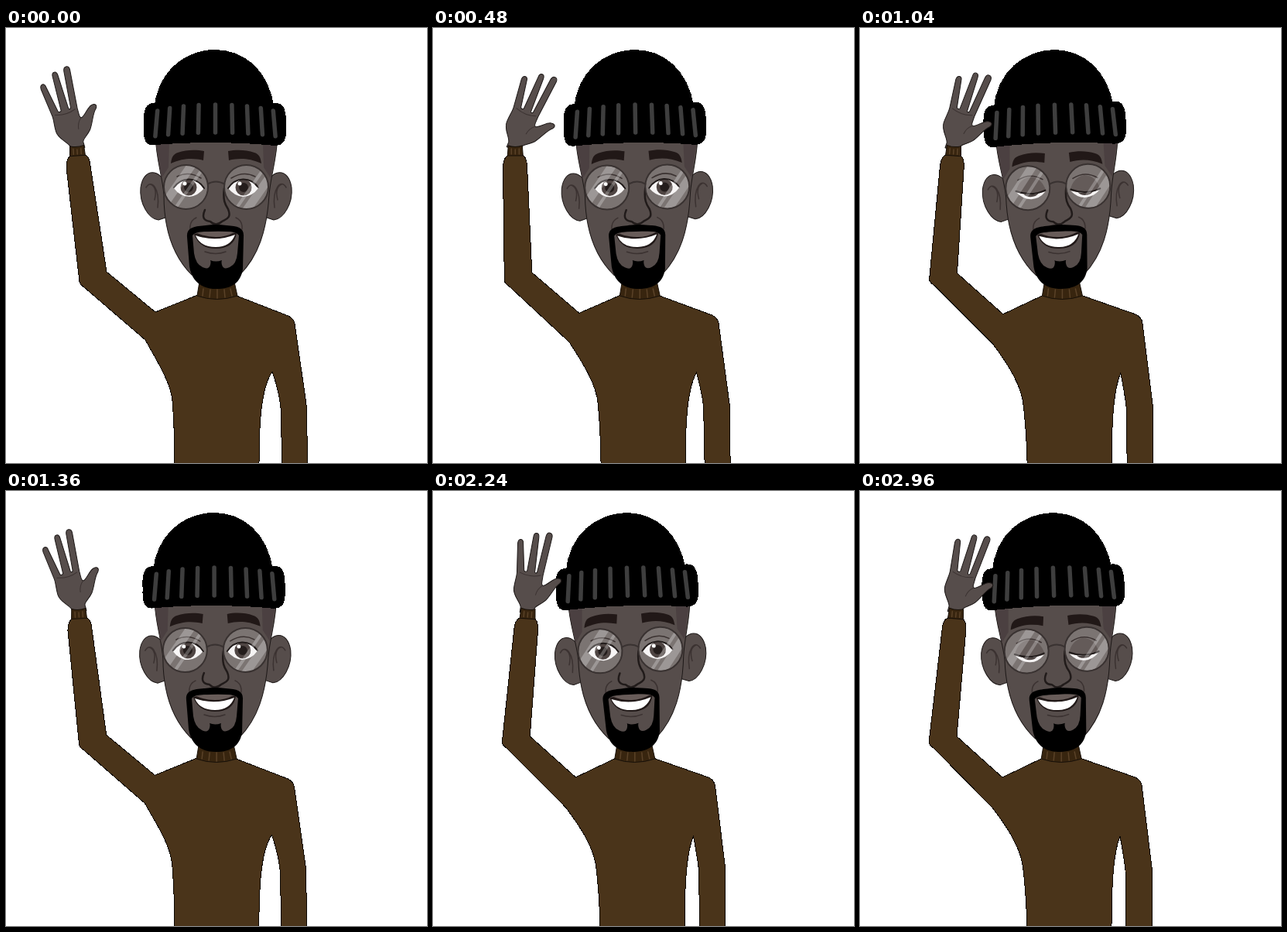
Write an HTML page that moves like this. It is 544 px wide and 562 px high and loops after 3.04 s.

```html
<!DOCTYPE html>
<html lang="en">
<head>
<meta charset="utf-8">
<title>Waving man</title>
<style>
  html, body { margin: 0; width: 100%; height: 100%; overflow: hidden; background: #fff; }
  svg { display: block; width: 544px; height: 562px; }
  .line { fill: none; stroke: #211b1a; stroke-width: 2; stroke-linecap: round; stroke-linejoin: round; }
  .soft { fill: none; stroke: #3b3231; stroke-width: 1.5; stroke-linecap: round; }
  .skin { fill: #564d4b; stroke: #1d1817; stroke-width: 1; stroke-linejoin: round; }
  .wool { fill: #4a341a; stroke: #0c0804; stroke-width: 1; stroke-linejoin: round; }
  .wool, .hat { shape-rendering: crispEdges; }
  .rib { fill: #38250f; stroke: #171009; stroke-width: 1; }
  .knit { fill: none; stroke: #5a4228; stroke-width: 1.5; stroke-linecap: round; }
</style>
</head>
<body>
<svg viewBox="0 0 544 562">
  <defs>
    <clipPath id="lenses"><circle cx="232.5" cy="205.5" r="28"/><circle cx="310.5" cy="205.5" r="28"/></clipPath>
    <g id="ear">
      <path class="skin" d="M206 202C200 183 178 179 174 206C172 226 184 247 197 248L209 244Z"/>
      <path class="soft" d="M181 206C188 194 199 208 196 232M187 202Q196 206 192 222"/>
    </g>
    <g id="side">
      <path fill="#4b4041" d="M193.500 148H211L210 180L201 194Z"/>
      <path class="soft" d="M246 245Q237 249 238 260"/>
    </g>
    <path id="brow" fill="#211817" d="M213 175C214 167 216 163 222 161C233 157 246 157 256 159L255 171C242 168 229 168 213 175Z"/>
    <g id="open">
      <path fill="#f6f4f4" d="M217 207Q225 196 237 196Q249 197 256 207Q248 217 237 218Q225 218 217 207Z"/>
      <circle cx="236" cy="206" r="10.500" fill="#4f4543"/>
      <circle cx="236" cy="206" r="6" fill="#241d1c"/>
      <path class="line" d="M217 206Q225 195 237 195.500Q249 196 256 207"/>
      <path class="soft" d="M221 192Q236 184 252 194"/>
    </g>
    <g id="shut">
      <path fill="#645b59" d="M217 210Q222 192 237 191Q251 193 256 210Q236 219 217 210Z"/>
      <path fill="#f6f4f4" d="M218 211Q236 216 255 211Q247 220 237 220Q226 220 218 211Z"/>
      <path fill="#4c4341" d="M227 213Q236 215 246 213Q243 217 236 217Q230 217 227 213Z"/>
      <path class="line" d="M217 209Q236 217 255 209"/>
      <path class="soft" d="M220 195Q236 185 252 195"/>
    </g>
  </defs>

  <path id="body" class="wool"/>
  <g id="collar">
    <path class="rib" d="M250 328L247 346Q272 355 299 346L295 328Z"/>
    <path class="knit" d="M255 337L254 346M264 338L263 348M273 338V349M282 338L283 348M290 337L292 346"/>
  </g>

  <g id="head">
    <use href="#ear"/><use href="#ear" class="flip"/>
    <path class="skin" d="M193 138C194 170 202 190 204 216C204 262 216 295 240 319H302C326 295 337 262 340 216C342 190 350 170 351 138Z"/>
    <use href="#side"/><use href="#side" class="flip"/>
    <g id="brows"><use href="#brow"/><use href="#brow" class="flip"/></g>

    <path class="hat" d="M191 105C196 52 235 28 270 28C306 28 340 52 347 105Z"/>
    <path class="hat" d="M191 97C179 97 177 110 178 126C177 147 181 153 194 151C240 147 300 147 347 152C361 152 363 142 362 122C362 102 357 96 346 97Z"/>
    <g id="ribs" fill="none" stroke="#3e3e3e" stroke-width="5.500" stroke-linecap="round"></g>

    <path class="line" style="stroke-width:2.5" d="M282 207C280 222 283 228 287 234C292 246 284 247 279 250Q271 257 264 250C255 249 253 244 257 235"/>

    <circle cx="232.500" cy="205.500" r="28" fill="#7b7472"/>
    <circle cx="310.500" cy="205.500" r="28" fill="#7b7472"/>
    <g id="eyesOpen">
      <use href="#open"/><use href="#open" class="flip"/>
      <circle cx="231" cy="201" r="2.500" fill="#fff"/><circle cx="302" cy="201" r="2.500" fill="#fff"/>
    </g>
    <g id="eyesShut"><use href="#shut"/><use href="#shut" class="flip"/></g>
    <g clip-path="url(#lenses)" stroke="#fff" stroke-opacity=".25">
      <path d="M205 227L242 174M309 238L346 185" stroke-width="11"/>
      <path d="M218 234L256 179M297 234L335 179" stroke-width="4"/>
    </g>
    <g fill="none" stroke="#393231" stroke-width="2">
      <circle cx="232.500" cy="205.500" r="28.500"/>
      <circle cx="310.500" cy="205.500" r="28.500"/>
      <path d="M260 202Q271 195 283 202"/>
    </g>

    <path fill-rule="evenodd" d="M234 270C233 258 242 256 258 255Q271 253 285 255C300 256 308 258 307 270L306 312C303 329 292 337 272 337C252 337 240 327 237 308Z
      M241 268L243 291Q245 305 254 309Q262 313 264 306Q265 302 264 300Q271 303 279 300Q278 302 279 306Q281 313 289 309Q298 305 299 291L301 268Q298 263 284 263H258Q244 263 241 268Z"/>
    <path fill="#211918" d="M243 266Q271 261 298 265Q295 285 271 285Q249 285 243 266Z"/>
    <path fill="#685c59" d="M247 265Q271 261 295 264Q284 270 271 270Q258 270 247 265Z"/>
    <path fill="#fff" d="M245 268Q271 277 296 267Q290 283 271 283Q251 283 245 268Z"/>
    <path class="soft" d="M257 289Q271 294 284 289"/>
  </g>

  <path id="forearm" class="wool"/>
  <g id="hand">
    <path class="skin" d="M-9 6V-1C-11 -8 -21 -14 -21 -24C-21 -34 -19 -40 -20 -46L-24 -82C-24 -89 -17 -89 -17 -83L-11 -48Q-9 -46 -7 -48L-5 -93C-5 -100 2 -100 2 -93L3 -48Q4 -46 6 -48L11 -96C12 -103 19 -102 19 -96L14 -45C14 -36 13 -33 16 -32C22 -34 27 -43 33 -44C38 -45 40 -42 37 -38C31 -33 28 -22 22 -14C16 -7 9 -5 9 -1V6Z"/>
    <path class="soft" style="stroke-width:1" d="M-16 -45Q-2 -40 11 -45M15 -32Q9 -27 8 -19"/>
  </g>
  <g id="cuff">
    <path class="rib" d="M-9 -7Q0 -4 9 -7L10 6H-10Z"/>
    <path class="knit" d="M-5 -3V4M0 -2V4M5 -3V4"/>
  </g>
</svg>
<script>
  const $ = id => document.getElementById(id);
  const LOOP = 3040, STEP = 80, CYCLE = 2000, WAVE = CYCLE / 3;

  // Each shape is given leaning right and leaning left.
  const shapes = {
    body: [
      "M250 344L193 367L130 315L112 298L95 318L96 328Q97 332 101 335L180 403C195 430 213 458 215 482Q218 520 218 566L327 566C327 520 328 468 344 444Q353 470 355 490L357 566L390 566L388 486L373 382Q372 376 365 372L298 346Z",
      "M236 345L184 370L125 317L108 298L90 316L90 325Q91 329 95 332L171 409C190 434 209 462 211 490Q215 524 216 566L325 566C325 520 326 472 336 446Q341 472 343 490L344 566L377 566L377 486L364 380Q363 374 356 370L284 345Z"],
    forearm: [
      "M130 315L109 178Q108 165 102 164L85 164Q78 167 78 180L95 328Q96 332 101 335",
      "M125 317L137 178Q137 166 131 164L113 164Q107 167 106 180L89 325Q90 329 95 332"]
  };

  // Wrist angle through one wave: [phase in degrees, angle].
  const wrist = [[0, -16.5], [20, -18.5], [34, -18], [92, -17], [135, 2], [178, 13.6],
    [222, 16.6], [279, 20], [294, 19], [322, -2], [351, -14], [360, -16.5]];

  const mix = (a, b, k) => a + (b - a) * k;

  function blend([a, b], k) {
    const ends = b.match(/-?\d+/g);
    let i = 0;
    return a.replace(/-?\d+/g, n => mix(+n, +ends[i++], k).toFixed(2));
  }

  function along(keys, x) {
    const i = Math.max(1, keys.findIndex(k => k[0] >= x));
    const [x0, y0] = keys[i - 1], [x1, y1] = keys[i];
    return mix(y0, y1, (x - x0) / (x1 - x0));
  }

  for (const el of document.querySelectorAll(".flip"))
    el.setAttribute("transform", "translate(543 0) scale(-1 1)");

  let ribs = "";
  for (let i = -4; i <= 4; i++) {
    const x = 270.5 + i * 22.3 - i * Math.abs(i) * .9;
    ribs += `<path d="M${x} ${99 + i * i * .5}L${x + i * .7} ${135 + i * i * .3}"/>`;
  }
  $("ribs").innerHTML = ribs;

  function draw(t) {
    const phase = (t / WAVE * 360 + 20) % 360;
    const swing = ((1 + Math.cos(phase * Math.PI / 180)) / 2) ** 1.15;
    const lean = (.966 - swing) / .966;
    const move = (id, x, y, turn = 0) => $(id).setAttribute("transform", `translate(${x} ${y}) rotate(${turn})`);

    for (const id in shapes) $(id).setAttribute("d", blend(shapes[id], lean));
    move("collar", -12.8 * lean, 0);
    $("head").setAttribute("transform", `translate(${-12.8 * lean} 0) rotate(${-2 * lean} 271 337)`);
    move("hand", mix(91.5, 123.5, lean), mix(151, 152, lean), along(wrist, phase) + 2);
    move("cuff", mix(92, 124, lean), 159, mix(-4, 5, lean));

    const shut = Math.abs(t % CYCLE - CYCLE / 2) < 100;
    $("eyesShut").style.display = shut ? "" : "none";
    $("eyesOpen").style.display = shut ? "none" : "";
    move("brows", 0, shut ? 2.5 : 0);
  }

  const start = performance.now();
  function tick() {
    const t = (performance.now() - start) % LOOP;
    draw(Math.floor(t / STEP) * STEP);
    requestAnimationFrame(tick);
  }
  tick();
</script>
</body>
</html>
```
